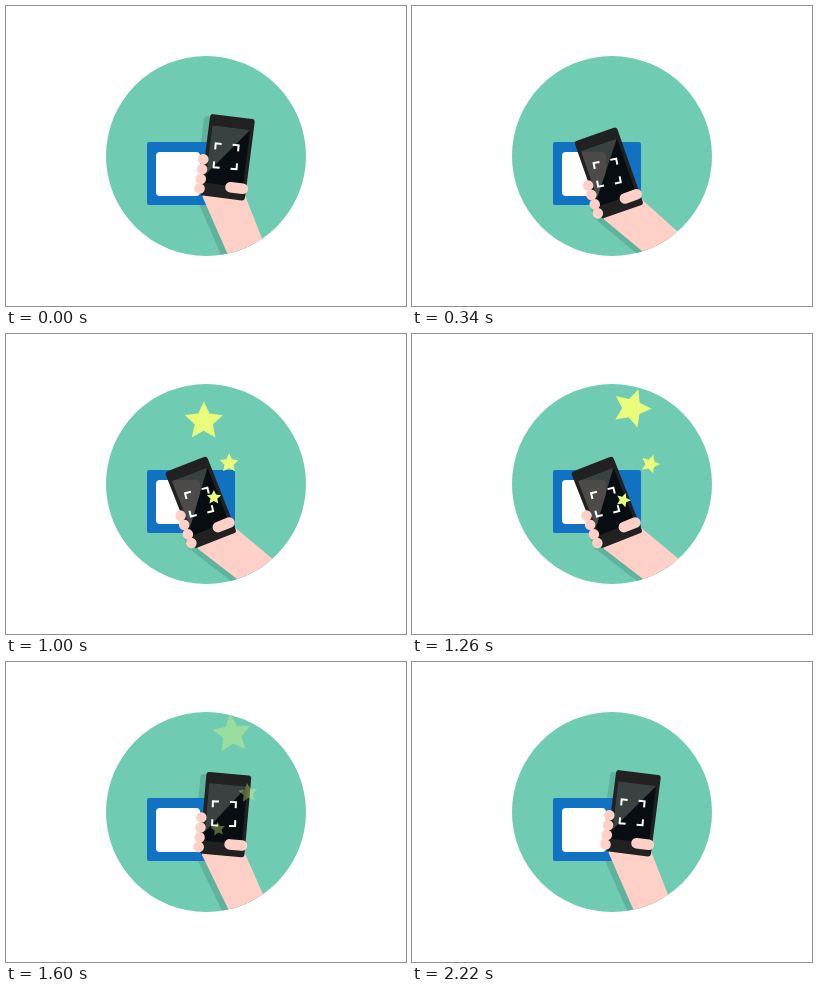
Recreate the animation shown at these times as an HTML page with a canvas. Size 400 px wide and 300 px high, loop 2.4 s.

```html
<!DOCTYPE html>
<html lang="en">
<head>
<meta charset="utf-8">
<title>Phone scan</title>
<style>
  html, body { margin: 0; height: 100%; overflow: hidden; background: #fff; }
  canvas { display: block; }
</style>
</head>
<body>
<canvas id="stage" width="400" height="300"></canvas>
<script>
const ctx = document.getElementById('stage').getContext('2d');
const LOOP = 2400, RAD = Math.PI / 180;
const SKIN = '#ffd0c8';
const GLOSS = [[-19, -30], [19, -30], [-19, 19]];
const ARM = [[-20, 36], [-19.6, 42.6], [37, 137], [67, 117], [22.4, 36]];
// Resting place of each star around the scanning phone: x, y, radius
const STARS = [[31, -96, 20], [47, -37, 10], [17, -1, 7.5]];

const clamp = v => Math.min(1, Math.max(0, v));
const mix = (a, b, p) => a + (b - a) * p;

// Critically damped move from 0 to 1, with time in ms
function settle(t, rate) {
  const k = Math.max(0, t) * rate / 1000;
  return 1 - (1 + k) * Math.exp(-k);
}
const reachAt = (t, rate) => settle(t - 10, rate) - settle(t - 1270, rate);

function box(x, y, w, h, r, color) {
  ctx.beginPath();
  ctx.roundRect(x, y, w, h, r);
  ctx.fillStyle = color;
  ctx.fill();
}

function disc(x, y, r, color) {
  ctx.beginPath();
  ctx.arc(x, y, r, 0, 7);
  ctx.fillStyle = color;
  ctx.fill();
}

function trace(points) {
  ctx.beginPath();
  points.forEach(([x, y]) => ctx.lineTo(x, y));
  ctx.closePath();
}

function polygon(points, color) {
  trace(points);
  ctx.fillStyle = color;
  ctx.fill();
}

function place(x, y, angle) {
  ctx.translate(x, y);
  ctx.rotate(angle * RAD);
}

const drawPanel = color => box(150, 146, 44, 44, 4, color);
const drawBody = color => box(-22.5, -41, 45, 82, 3, color);

function drawCard() {
  box(141, 136, 88, 63, 2, '#1172c2');
  drawPanel('#fff');
}

function drawShadow(x, y, angle) {
  const color = '#5fb39c';
  ctx.save();
  place(x - 6, y + 2, angle);
  polygon(ARM, color);
  drawBody(color);
  ctx.restore();
}

function drawBrackets(angle) {
  ctx.save();
  place(-1.5, -.8, angle);
  ctx.strokeStyle = '#fff';
  ctx.lineWidth = 2;
  ctx.beginPath();
  for (const sx of [-1, 1]) for (const sy of [-1, 1]) {
    const x = sx * 11.5, y = sy * 12;
    ctx.moveTo(x - sx * 6, y);
    ctx.lineTo(x, y);
    ctx.lineTo(x, y - sy * 6);
  }
  ctx.stroke();
  ctx.restore();
}

function drawScreen() {
  box(-19, -30, 38, 58, 0, '#080d12');
  polygon(GLOSS, '#3a4141');
  // The card's panel shows dimly through the gloss
  ctx.save();
  trace(GLOSS);
  ctx.clip();
  ctx.resetTransform();
  drawPanel('#4c4b4a');
  ctx.restore();
}

function drawPhone([x, y, angle], bracketAngle) {
  ctx.save();
  place(x, y, angle);
  polygon(ARM, SKIN);
  drawBody('#212121');
  drawScreen();
  drawBrackets(bracketAngle - angle);
  [5, 15, 25, 34.5].forEach(fy => box(-29, fy - 5.3, 10.5, 10.6, 5.2, SKIN));
  box(1.5, 24, 23, 10.6, 5.3, SKIN);
  ctx.restore();
}

function drawStars(t) {
  const alpha = Math.min(clamp((t - 680) / 160), clamp((1690 - t) / 250));
  if (!alpha) return;
  const lag = clamp((1620 - t) / 1054) ** 3 * 4.91;
  const spread = 1 - .2 * lag, size = clamp((t - 660) / 240);
  const spin = (t - 1000) * .35;
  ctx.save();
  ctx.globalAlpha = alpha;
  place(195, 168, -16 * lag);
  for (const [x, y, r] of STARS) {
    ctx.save();
    place(x * spread, y * spread, 16 * lag + spin);
    polygon(Array.from({ length: 10 }, (_, i) => {
      const a = (i * 36 - 90) * RAD, d = size * r * (i % 2 ? .48 : 1);
      return [d * Math.cos(a), d * Math.sin(a)];
    }), '#e9fc7c');
    ctx.restore();
  }
  ctx.restore();
}

function draw(t) {
  const reach = reachAt(t, 12.7);
  const pose = [mix(221.5, 194.8, reach), mix(151.3, 168.3, reach), mix(7.3, -21.5, reach)];
  ctx.clearRect(0, 0, 400, 300);
  disc(200, 150, 100, '#70cbb3');
  ctx.save();
  ctx.beginPath();
  ctx.arc(200, 150, 100, 0, 7);
  ctx.clip();
  drawShadow(...pose);
  drawCard();
  drawPhone(pose, mix(5, -14, reachAt(t, 10)));
  drawStars(t);
  ctx.restore();
}

const start = performance.now();
function tick() {
  draw((performance.now() - start) % LOOP);
  requestAnimationFrame(tick);
}
tick();
</script>
</body>
</html>
```
